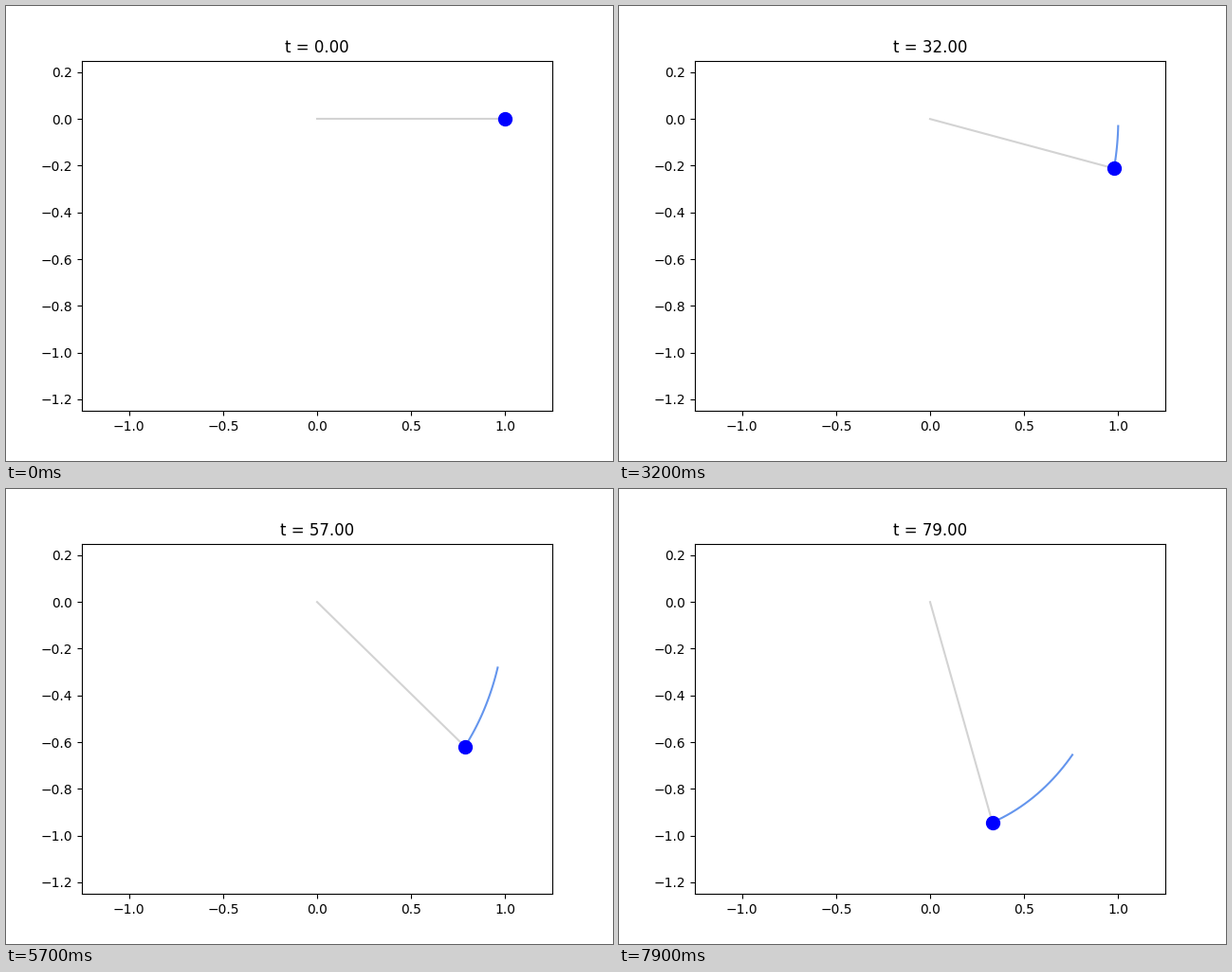
These frames come from a looping animation (640x480 px, 8000 ms). A matplotlib script:

```python
import numpy as np
import matplotlib.pyplot as plt
from matplotlib.animation import FuncAnimation

FRAMES = 80
INTERVAL = 100   # ms
OMEGA = 0.02042  # sqrt(g / length), per frame
TRAIL = 20
SUBSTEPS = 10


def swing(n):
    """Angle below the horizontal of a pendulum released from rest, per frame."""
    def rate(s):
        return np.array([s[1], OMEGA**2 * np.cos(s[0])])

    h = 1 / SUBSTEPS
    state = np.zeros(2)
    angles = []
    for _ in range(n):
        angles.append(state[0])
        for _ in range(SUBSTEPS):
            k1 = rate(state)
            k2 = rate(state + h / 2 * k1)
            k3 = rate(state + h / 2 * k2)
            k4 = rate(state + h * k3)
            state = state + h / 6 * (k1 + 2 * k2 + 2 * k3 + k4)
    return np.array(angles)


phi = swing(FRAMES)
x, y = np.cos(phi), -np.sin(phi)

fig, ax = plt.subplots(figsize=(6.4, 4.8), dpi=100)
ax.set_xlim(-1.25, 1.25)
ax.set_ylim(-1.25, 0.25)
title = ax.set_title("t = 0.00")

rod, = ax.plot([], [], color="lightgray", lw=1.5)
trail, = ax.plot([], [], color="cornflowerblue", lw=1.5)
bob, = ax.plot([], [], "o", color="blue", markersize=10)


def update(i):
    start = max(0, i - TRAIL)
    rod.set_data([0, x[i]], [0, y[i]])
    trail.set_data(x[start:i + 1], y[start:i + 1])
    bob.set_data([x[i]], [y[i]])
    title.set_text(f"t = {i:.2f}")
    return rod, trail, bob, title


ani = FuncAnimation(fig, update, frames=FRAMES, interval=INTERVAL,
                    repeat=True, repeat_delay=0, blit=False)
plt.show()
```
